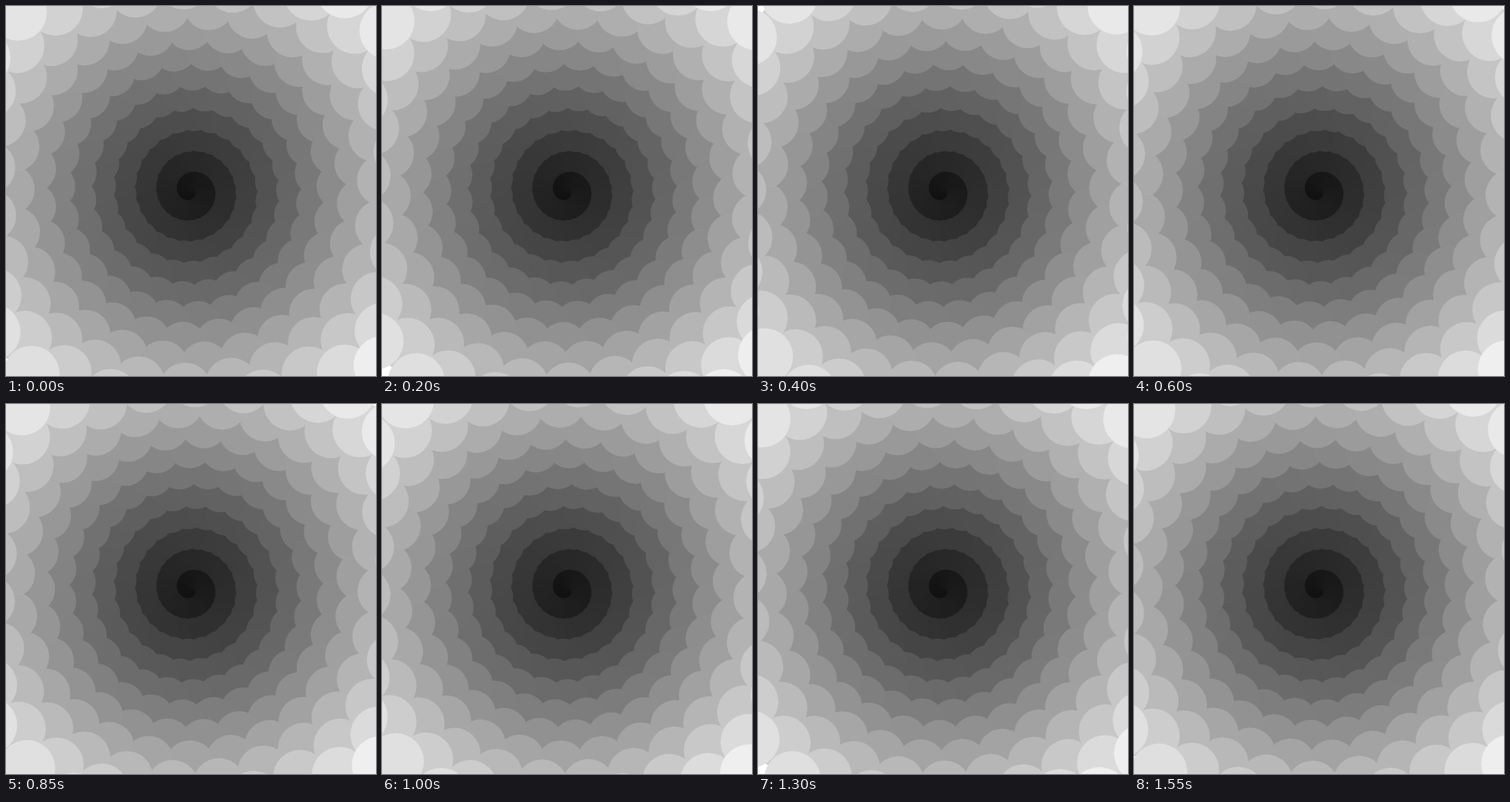
Animation of 500 by 500 pixels, one loop 1600 ms. Source, as an HTML page with a canvas:

```html
<!DOCTYPE html>
<html lang="en">
<head>
<meta charset="utf-8">
<title>Spiral of discs</title>
<style>
  html, body { margin: 0; width: 100%; height: 100%; overflow: hidden; background: #fff; }
  canvas { display: block; width: 500px; height: 500px; }
</style>
</head>
<body>
<canvas id="stage" width="500" height="500"></canvas>
<script>
const ctx = document.getElementById('stage').getContext('2d');
const TAU = Math.PI * 2;
const STEP_MS = 50, STEPS = 32;
const COUNT = 325;
const MID = 13.5395, SWING = 0.0211;  // degrees between neighbouring discs
const LEAD = -4.1;                    // angle of the first disc
const PITCH = 28.88;                  // spiral growth per turn

function draw(step) {
  const gap = MID + SWING * Math.cos(TAU * (step + 1) / STEPS);
  ctx.fillStyle = '#fff';
  ctx.fillRect(0, 0, 500, 500);
  for (let k = 0; k < COUNT; k++) {
    const turns = (LEAD + k * gap) / 360;
    const angle = turns * TAU;
    const dist = PITCH * turns;
    const grey = Math.round(5 + k * 0.723);
    ctx.fillStyle = `rgb(${grey},${grey},${grey})`;
    ctx.beginPath();
    ctx.arc(250 + dist * Math.cos(angle), 250 + dist * Math.sin(angle),
            22.5 + 1.38 * turns, 0, TAU);
    ctx.fill();
  }
}

const start = performance.now();
let shown = -1;
function tick() {
  const step = Math.floor((performance.now() - start) / STEP_MS) % STEPS;
  if (step !== shown) draw(shown = step);
  requestAnimationFrame(tick);
}
tick();
</script>
</body>
</html>
```
